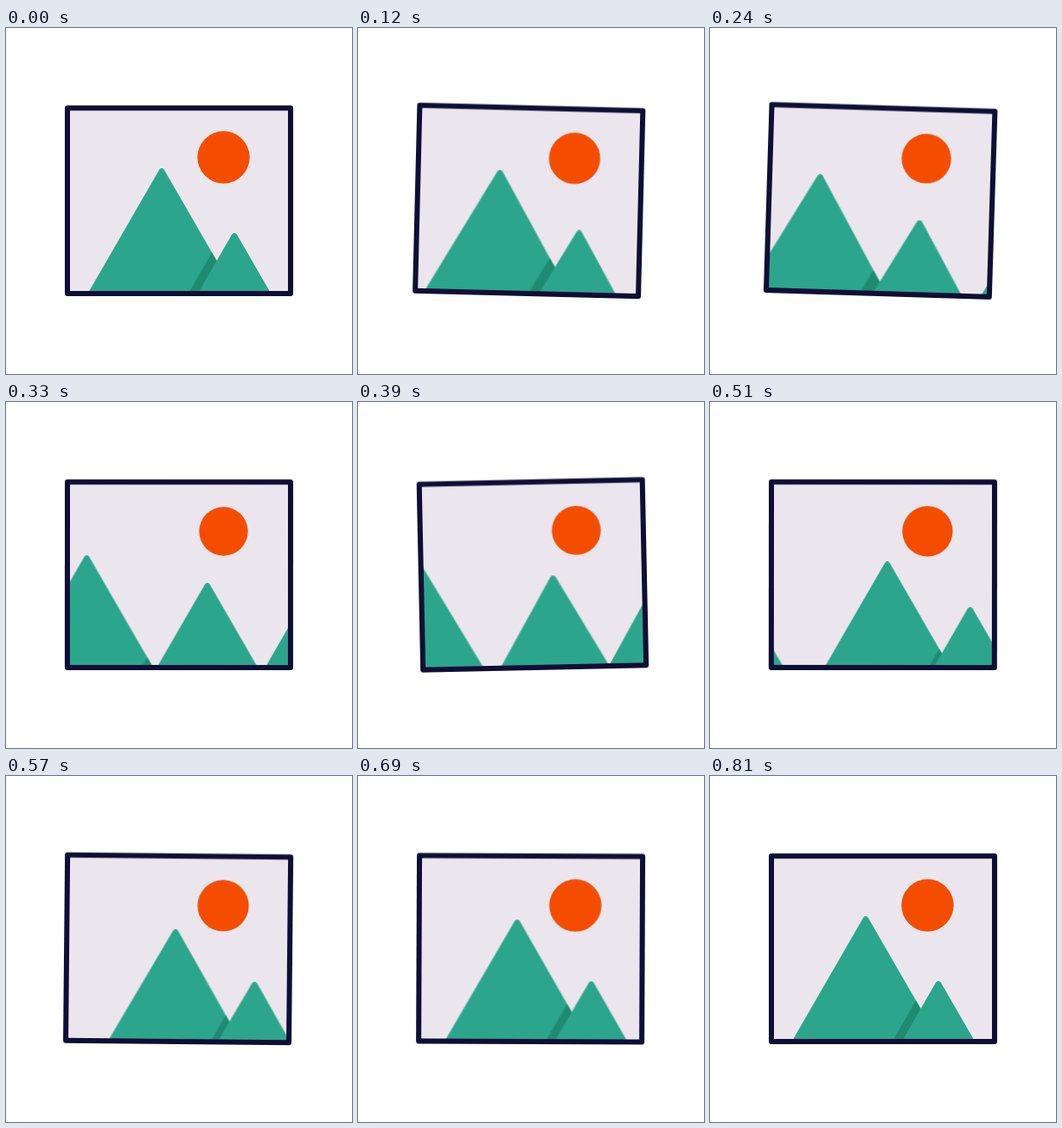
Recreate the animation shown at these times as an HTML page. Size 400 by 400 pixels, loop 2870 ms.

```html
<!DOCTYPE html>
<html lang="en">
<head>
<meta charset="utf-8">
<title>Swinging picture</title>
<style>
  html, body { margin: 0; width: 100%; height: 100%; overflow: hidden; background: #fff; }
  svg { display: block; width: 100%; height: 100%; }

  .picture, .sun, .peak, .cast, .inset {
    animation: 2870ms cubic-bezier(.333, 0, .667, 1) infinite;
  }
  .picture { animation-name: swing; transform-origin: 200px 107px; }
  .sun { animation-name: shrink; transform-origin: 251.5px 149.5px; }
  .leaving { animation-name: leave; }
  .growing { animation-name: grow; }
  .arriving { animation-name: arrive; }
  .leaving .cast { animation-name: cast-leave; }
  .growing .cast { animation-name: cast-grow; }
  .inset { animation-name: widen; }

  /* the move takes 800 ms (27.875%), then everything rests */
  @keyframes swing {
    0% { transform: rotate(0deg); }
    6.969% { transform: rotate(2.15deg); animation-timing-function: cubic-bezier(.333, 0, .667, .8); }
    11.6% { transform: rotate(0deg); animation-timing-function: cubic-bezier(.333, .18, .667, 1); }
    14.11% { transform: rotate(-1.3deg); }
    19.76% { transform: rotate(.56deg); }
    27.875%, 100% { transform: rotate(0deg); }
  }
  @keyframes shrink {
    0%, 24.04%, 100% { transform: scale(1); }
    12.02% { transform: scale(.933); }
  }
  @keyframes leave {
    0% { transform: translate(180px, 162.2px); }
    27.875%, 100% { transform: translate(-53px, 202.7px); }
  }
  @keyframes grow {
    0% { transform: translate(264px, 237px); }
    27.875%, 100% { transform: translate(180px, 162.2px); }
  }
  @keyframes arrive {
    0% { transform: translate(388px, 237px); }
    27.875%, 100% { transform: translate(264px, 237px); }
  }
  /* shadows, relative to the peak they fall on */
  @keyframes cast-leave {
    0% { transform: translate(73px, 74.8px); }
    27.875%, 100% { transform: translate(203.5px, -40.5px); }
  }
  @keyframes cast-grow {
    0% { transform: translate(124px, 0); }
    27.875%, 100% { transform: translate(84px, 74.8px); }
  }
  @keyframes widen {
    0%, 15.33% { transform: translate(0, 0); animation-timing-function: cubic-bezier(.15, .6, .4, 1); }
    27.875%, 100% { transform: translate(-11px, 0); }
  }
</style>
</head>
<body>
<svg viewBox="0 0 400 400">
  <defs>
    <path id="peak" d="M-2.77 1.6A3.2 3.2 0 0 1 2.77 1.6L118.24 201.6H-118.24Z"/>
    <clipPath id="peakClip"><use href="#peak"/></clipPath>
    <clipPath id="frameClip"><rect x="71" y="92.5" width="258" height="214.5"/></clipPath>
  </defs>
  <g class="picture">
    <rect x="71" y="92.5" width="258" height="214.5" fill="#ebe6ee"/>
    <circle class="sun" cx="251.5" cy="149.5" r="30.2" fill="#f44d00"/>
    <g clip-path="url(#frameClip)" fill="#2ca58d">
      <g class="peak leaving">
        <use href="#peak"/>
        <g clip-path="url(#peakClip)">
          <use class="cast" href="#peak" fill="#1f8a72"/>
        </g>
      </g>
      <g class="peak growing">
        <use href="#peak"/>
        <g clip-path="url(#peakClip)">
          <g class="cast"><use class="inset" href="#peak" fill="#1f8a72"/></g>
        </g>
      </g>
      <g class="peak arriving"><use href="#peak"/></g>
    </g>
    <rect x="71" y="92.5" width="258" height="214.5" fill="none" stroke="#0f0e35" stroke-width="6" stroke-linejoin="round"/>
  </g>
</svg>
</body>
</html>
```
